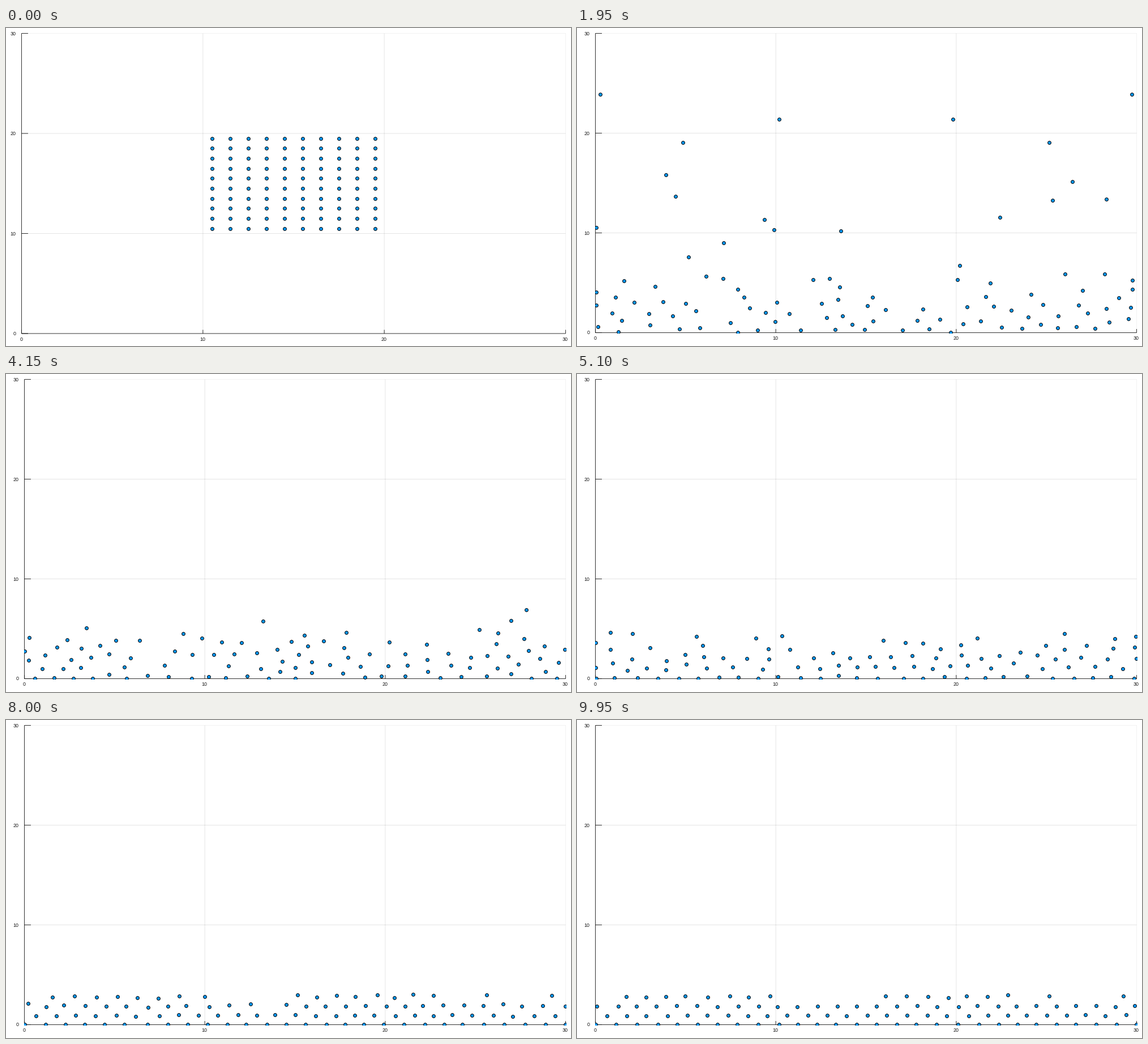
Write a matplotlib script that moves like this. It is 998 by 561 pixels and loops after 10 s.

```python
import numpy as np
import matplotlib.pyplot as plt
from matplotlib.animation import FuncAnimation
from matplotlib.patches import Rectangle

W, H, DPI = 998, 561, 64
FRAMES, INTERVAL = 200, 50
SIZE = 30.0                 # side of the box
STEPS = 60                  # physics steps per frame
DT = INTERVAL / 1000 / STEPS
GRAVITY, EPS, BOUNCE = 50.0, 16.0, 0.9


def px(n):
    """Pixels to points."""
    return n * 72 / DPI


def forces(x, y):
    """Lennard-Jones accelerations plus gravity."""
    dx = x[:, None] - x
    dy = y[:, None] - y
    r2 = dx * dx + dy * dy
    np.fill_diagonal(r2, np.inf)
    inv = 1 / np.maximum(r2, 0.4)
    s6 = inv * inv * inv
    f = (24 * EPS) * inv * s6 * (2 * s6 - 1)
    return (f * dx).sum(1), (f * dy).sum(1) - GRAVITY


def reflect(p, v, low_bounce):
    """Bounce off the two walls of one axis, in place."""
    low, high = p < 0, p > SIZE
    p[low] *= -low_bounce
    v[low] = np.abs(v[low]) * low_bounce
    p[high] = 2 * SIZE - p[high]
    v[high] = -np.abs(v[high])
    np.clip(p, 0, SIZE, out=p)


def simulate():
    """Particle positions for every frame, starting from a resting lattice."""
    side = np.arange(10) + 10.5
    x, y = (a.ravel().copy() for a in np.meshgrid(side, side))
    vx, vy = np.zeros_like(x), np.zeros_like(y)
    track = [np.column_stack([x, y])]
    for k in range(1, FRAMES):
        drag = 0.35 + 0.015 * k * INTERVAL / 1000
        keep = 1 - drag * DT
        for _ in range(STEPS):
            acc_x, acc_y = forces(x, y)
            vx = (vx + acc_x * DT) * keep
            vy = (vy + acc_y * DT) * keep
            x = x + vx * DT
            y = y + vy * DT
            reflect(x, vx, 1.0)
            reflect(y, vy, BOUNCE)
        track.append(np.column_stack([x, y]))
    return track


class Chart:
    """Axes, grid, labels and dots for one plot area in pixels."""

    def __init__(self, ax, left, bottom, right=988.5, top=9.5):
        self.ax = ax
        self.origin = np.array([left, bottom])
        self.scale = np.array([right - left, top - bottom]) / SIZE
        self.parts = []
        for v in (0, 10, 20, 30):
            gx, gy = self.to_px(np.array([v, v]))
            if v:
                alpha = 0.05 if v == 30 else 0.1
                self.line([gx, gx], [top, bottom], alpha)
                self.line([left, right], [gy, gy], alpha)
            self.line([gx, gx], [bottom, bottom - 6.5], 0.8)
            self.line([left, left + 11.5], [gy, gy], 0.8)
            self.label(gx - 0.6, bottom + 13, v, "center")
            self.label(left - 10.3, gy + 3, v, "right")
        self.line([left, left], [top, bottom], 0.8)
        self.line([left, right], [bottom, bottom], 0.8)
        self.dots = ax.scatter([], [], s=px(5.8) ** 2, c="#009afa",
                               edgecolors="black", linewidths=px(1), zorder=3)
        area = Rectangle((left - 0.5, top - 1.5), right - left + 1.5,
                         bottom - top + 2, transform=ax.transData)
        self.dots.set_clip_path(area)
        self.parts.append(self.dots)

    def to_px(self, p):
        return self.origin + p * self.scale

    def line(self, xs, ys, alpha):
        self.parts += self.ax.plot(xs, ys, color="black", alpha=alpha, lw=px(1),
                                   solid_capstyle="butt", snap=False)

    def label(self, x, y, value, align):
        self.parts.append(self.ax.text(x, y, str(value), ha=align, va="baseline",
                                       family="Liberation Sans", size=px(8.9),
                                       color="#1a1a1a"))

    def show(self, on):
        for part in self.parts:
            part.set_visible(on)


fig = plt.figure(figsize=(W / DPI, H / DPI), dpi=DPI, facecolor="white")
stage = fig.add_axes([0, 0, 1, 1])
stage.axis("off")
stage.set_autoscale_on(False)
stage.set_xlim(0, W)
stage.set_ylim(H, 0)

first = Chart(stage, 27.5, 539)
rest = Chart(stage, 32.5, 537.5)
track = simulate()


def update(k):
    # The plot area shifts slightly once the motion starts.
    chart, other = (first, rest) if k == 0 else (rest, first)
    other.show(False)
    chart.show(True)
    chart.dots.set_offsets(chart.to_px(track[k]))
    return []


anim = FuncAnimation(fig, update, frames=FRAMES, interval=INTERVAL,
                     init_func=lambda: update(0), repeat=True, repeat_delay=0)
plt.show()
```
